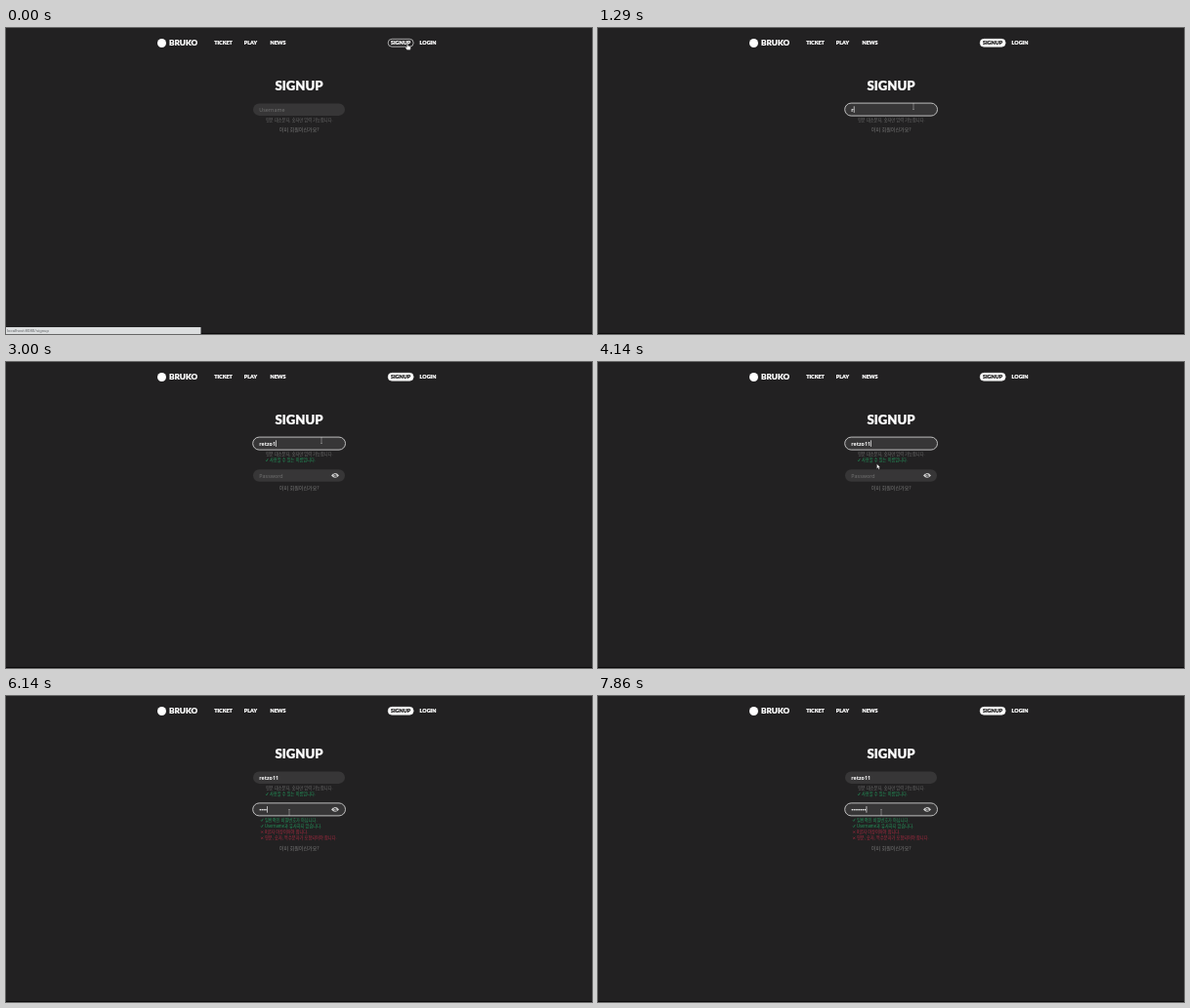
Animation, 600 px wide and 314 px high, one loop 8 s. Source, as an HTML page:

```html
<!DOCTYPE html>
<html lang="ko">
<head>
<meta charset="utf-8">
<title>Signup</title>
<style>
  html, body { margin: 0; width: 100%; height: 100%; overflow: hidden; background: #222122; }
  svg { display: block; width: 600px; height: 314px; }
  .head { font-family: Lato, Inter, sans-serif; font-weight: 900; fill: #fff; stroke: #fff; stroke-width: .22; }
  .nav { font-size: 5.4px; text-anchor: middle; }
  .field { font: 700 5.3px "Noto Sans", sans-serif; fill: #fff; }
  .hint { font: 500 5.4px "Noto Sans", sans-serif; fill: #707070; }
  .ko { font-family: "Noto Sans CJK KR", "Noto Sans CJK", sans-serif; font-size: 4.2px; fill: #6c6c6c; }
  .link { font-size: 5.05px; fill: #7a7a7a; text-anchor: middle; }
  .ok text { fill: #239a5d; }
  .bad text { fill: #ac2a40; }
  .mark { fill: none; stroke-width: .6; }
  .ok .mark { stroke: #239a5d; }
  .bad .mark { stroke: #ac2a40; }
  .ring { fill: none; stroke: #d4d4d4; stroke-width: .9; }
</style>
</head>
<body>
<svg viewBox="0 0 600 314">
  <defs>
    <path id="tick" d="M0 -1.4L.8 -.4L2.3 -3"/>
    <path id="cross" d="M.2 -2.7L2.2 -.6M2.2 -2.7L.2 -.6"/>
  </defs>
  <rect width="600" height="314" fill="#222122"/>
  <rect y="313" width="600" height="1" fill="#0b0a0b"/>

  <circle cx="159.5" cy="15.5" r="4.5" fill="#fff"/>
  <text class="head" x="167" y="18.3" font-size="8.2">BRUKO</text>
  <g class="head nav">
    <text x="222.5" y="17">TICKET</text>
    <text x="250.5" y="17">PLAY</text>
    <text x="278.5" y="17">NEWS</text>
    <text x="432" y="17">LOGIN</text>
  </g>
  <rect id="pill" x="391.2" y="11.3" width="26" height="7.9" rx="3.95" stroke="#e6e6e6" stroke-width=".7"/>
  <text id="pillText" class="head nav" x="404" y="17">SIGNUP</text>

  <text class="head" x="300" y="63.6" font-size="13.1" text-anchor="middle">SIGNUP</text>

  <rect x="253" y="77.5" width="94" height="12.4" rx="6.2" fill="#373637"/>
  <rect id="nameRing" class="ring" x="252.7" y="77.1" width="94.8" height="13" rx="6.5"/>
  <text id="nameHint" class="hint" x="259.3" y="85.7">Username</text>
  <text id="name" class="field" x="259.3" y="85.7"></text>
  <text class="ko" x="266" y="96.1">영문 대소문자, 숫자만 입력 가능합니다.</text>

  <g id="pass">
    <g id="nameOk" class="ok"></g>
    <rect x="253" y="110.3" width="94" height="12.4" rx="6.2" fill="#373637"/>
    <rect id="passRing" class="ring" x="252.7" y="109.9" width="94.8" height="13" rx="6.5"/>
    <text id="passHint" class="hint" x="259.3" y="118.5">Password</text>
    <g id="dots" fill="#fff"></g>
    <path d="M333 116.4Q337 111.8 341 116.4Q337 121 333 116.4Z" fill="#d2d2d2"/>
    <circle cx="337" cy="116.4" r="1.15" fill="none" stroke="#373637" stroke-width=".7"/>
    <path d="M334.1 113.4L340.2 119.2" stroke="#373637" stroke-width=".6"/>
  </g>
  <g id="rules"></g>
  <text id="link" class="ko link" x="300.3">이미 회원이신가요?</text>
  <rect id="caret" width=".7" height="6.6" fill="#f2f2f2"/>

  <g id="status">
    <rect y="307" width="199.5" height="7" fill="#dcdedf"/>
    <text x="1" y="312.1" font-family="Roboto, sans-serif" font-size="4.3" fill="#63666a">localhost:8080/signup</text>
  </g>

  <path id="arrow" d="M0 0V5L1.15 4L2 5.8L2.9 5.4L2.1 3.7H3.6Z" fill="#fff" stroke="#111" stroke-width=".3"/>
  <path id="beam" d="M-.9 -3.1Q0 -3.1 0 -2.5V2.5Q0 3.1 -.9 3.1M.9 -3.1Q0 -3.1 0 -2.5M0 2.5Q0 3.1 .9 3.1" fill="none" stroke="#aaa" stroke-width=".6"/>
  <path id="hand" d="M-.6 .2Q0 -.5 .6 .2V2.3L3 2.9Q3.7 3.2 3.5 4L3 6.6H-.4L-2.2 4.1Q-2.3 3.2 -1.3 3.5L-.6 4Z" fill="#fff" stroke="#111" stroke-width=".3"/>
</svg>
<script>
const LOOP = 8000;
const $ = id => document.getElementById(id);
const show = (id, on) => $(id).style.display = on ? '' : 'none';

const line = (x, y, text, mark) =>
  `<use href="#${mark}" class="mark" x="${x}" y="${y}"/><text class="ko" x="${x + 4}" y="${y}">${text}</text>`;
$('nameOk').innerHTML = line(266, 102.2, '사용할 수 있는 이름입니다.', 'tick');
const rules = [
  ['일반적인 비밀번호가 아닙니다.', true],
  ['Username과 유사하지 않습니다.', true],
  ['8글자 이상이어야 합니다.', false],
  ['영문, 숫자, 특수문자가 포함되어야 합니다.', false]
];
$('rules').innerHTML = rules.map(([text, ok], i) =>
  `<g class="${ok ? 'ok' : 'bad'}">${line(261, 128.8 + i * 6.2, text, ok ? 'tick' : 'cross')}</g>`).join('');
for (let i = 0; i < 8; i++)
  $('dots').innerHTML += `<circle cx="${260.3 + i * 1.88}" cy="116.7" r=".8"/>`;

// Each row: start time, pointer shape, x, y
const pointer = [
  [0, 'hand', 411, 16], [140, 'hand', 413, 16], [290, 'arrow', 428, 28],
  [430, 'arrow', 420, 50], [570, 'arrow', 383, 71], [710, 'beam', 345, 81], [860, 'beam', 323, 80.5],
  [3710, 'beam', 319, 82], [3860, 'beam', 305, 87], [4000, 'arrow', 291, 99], [4140, 'arrow', 285.5, 104.5],
  [4290, 'arrow', 286, 108], [4430, 'beam', 288, 114], [4570, 'beam', 289, 117], [4710, 'beam', 290, 119.5]
];
const user = 'retzo11';
const nameKeys = [1290, 1710, 1860, 2290, 2570, 3000, 3290];
const passKeys = [5710, 5860, 6000, 6140, 6430, 7000, 7290, 7570];
const count = (keys, t) => keys.filter(k => k <= t).length;
const ramp = (t, start) => t < start ? 0 : t < start + 140 ? .5 : 1;

function draw(t) {
  const [, shape, x, y] = pointer.filter(p => p[0] <= t).pop();
  for (const s of ['hand', 'arrow', 'beam']) show(s, s === shape);
  $(shape).setAttribute('transform', `translate(${x} ${y})`);

  const hover = t < 290;
  show('status', hover);
  $('pill').setAttribute('fill', hover ? '#222122' : '#fff');
  $('pillText').style.fill = $('pillText').style.stroke = hover ? '#fff' : '#222122';

  const typed = count(nameKeys, t), hidden = count(passKeys, t);
  $('name').textContent = user.slice(0, typed);
  show('nameHint', !typed);
  show('pass', t >= 1430);
  show('rules', hidden);
  show('passHint', !hidden);
  [...$('dots').children].forEach((d, i) => d.style.display = i < hidden ? '' : 'none');
  $('link').setAttribute('y', hidden ? 158.2 : t >= 1430 ? 131.4 : 106.4);

  const passFocus = ramp(t, 4860);
  $('nameRing').style.opacity = ramp(t, 860) - passFocus;
  $('passRing').style.opacity = passFocus;
  show('caret', t >= 1000);
  const inPass = t >= 4860;
  const end = inPass ? 259.3 + hidden * 1.9
    : 259.3 + (typed ? $('name').getComputedTextLength() : 0);
  $('caret').setAttribute('x', end + .1);
  $('caret').setAttribute('y', inPass ? 113.1 : 80.3);
}

const begin = performance.now();
function tick() {
  draw((performance.now() - begin) % LOOP);
  requestAnimationFrame(tick);
}
tick();
</script>
</body>
</html>
```
